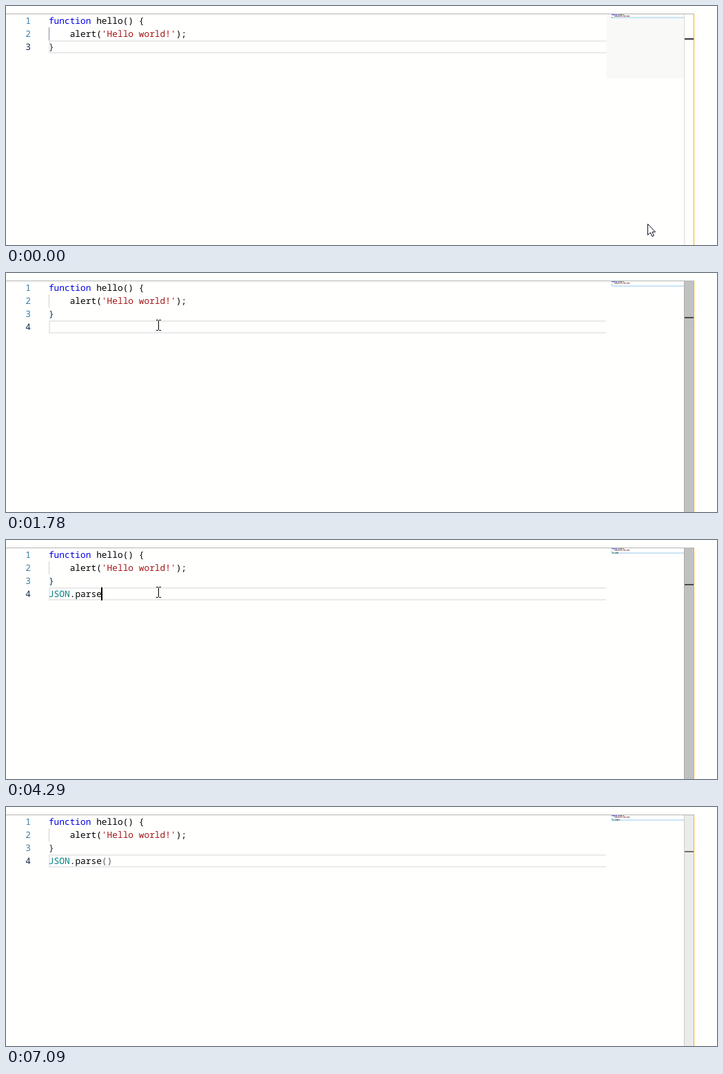
Animation of 1032x348 px, one loop 7.17 s. Source, as an HTML page:

```html
<!DOCTYPE html>
<html lang="en">
<head>
<meta charset="utf-8">
<title>Code editor</title>
<style>
  html, body { margin: 0; width: 100%; height: 100%; overflow: hidden; background: #fffffe; }
  svg { display: block; width: 1032px; height: 348px; }
  text { white-space: pre; text-rendering: geometricPrecision; font: 12.83px "Noto Sans Mono", monospace; }
  .small { font-size: 10.92px; }
  .doc { font: 13.48px "Open Sans", sans-serif; }
</style>
</head>
<body>
<svg id="stage" viewBox="0 0 1032 348"></svg>
<script>
const LOOP = 7170;
const CHAR = 7.697, LEFT = 61.9, LINE = 19, TOP = 12;
const MOVE_IN = [70, 150, 230, 310, 380, 460];
const MOVE_OUT = [6400, 6480, 6550, 6630];
const FADE = [6860, 6940, 7010, 7090];
const MAP_FADE = [.04, .12, .16, .1, .04, 0, 0];
const CARET_ON = [[610, 1090], [1320, 1780], [1950, 2410], [2560, 3100], [3330, 4080],
                  [4290, 4750], [4980, 5450], [5930, 6400]];
const TYPED = [[1320, ''], [1950, 'J'], [2560, 'JSON'], [3330, 'JSON.'],
               [3580, 'JSON.p'], [4290, 'JSON.parse'], [4980, 'JSON.parse()']];

const stage = document.getElementById('stage');

function add(parent, tag, attrs) {
  const el = document.createElementNS('http://www.w3.org/2000/svg', tag);
  for (const key in attrs) el.setAttribute(key, attrs[key]);
  parent.appendChild(el);
  return el;
}
const group = (parent = stage) => add(parent, 'g', {});
const box = (x, y, width, height, fill, parent = stage) =>
  add(parent, 'rect', { x, y, width, height, fill });
const frame = (x, y, w, h, fill, stroke, parent = stage) =>
  add(parent, 'rect', { x: x + .5, y: y + .5, width: w - 1, height: h - 1, fill, stroke });
const path = (d, stroke, parent, fill = 'none') => add(parent, 'path', { d, stroke, fill });

// parts: [text, colour, weight] runs set on one line
function write(x, y, parts, parent = stage, cls = '') {
  const el = add(parent, 'text', { x, y, class: cls });
  return parts.map(([str, fill, weight = 400]) => {
    const run = add(el, 'tspan', { fill, 'font-weight': weight });
    run.textContent = str;
    return run;
  });
}

const set = (el, attrs) => { for (const key in attrs) el.setAttribute(key, attrs[key]); };
const show = (el, on) => el.setAttribute('visibility', on ? 'visible' : 'hidden');
const place = (el, x, y) => el.setAttribute('transform', `translate(${x} ${y})`);
const passed = (times, t) => times.filter(v => v <= t).length;
const within = (t, a, b) => t >= a && t < b;
const ease = u => u * u * (3 - 2 * u);
const baseline = line => TOP + LINE * line + 14;

// Editor frame
box(0, 0, 1032, 348, '#fffffe');
const mapSlider = box(871, 12, 113, 93, '#646464');
const mapLine = box(879, 16, 105, 2, '#c9e4f6');
box(984, 12, 1, 336, '#dadada');
const tick = box(985, 47, 13, 2, '#3c3640');
const track = box(984, 12, 14, 336, '#646464');
box(0, 11, 999, 1, '#b4b4b4');
box(998, 12, 1, 336, '#f2b010');

// Current line outline, indent guide and bracket marks
const current = group();
box(62, 0, 809, 2, '#eaeaea', current);
box(62, 17, 809, 2, '#eaeaea', current);
box(62, 0, 2, 19, '#eaeaea', current);
const guide = box(62, 31, 1, 19, '#8f8a98');

const bracket = (x, y, parent) => frame(x, y, 8, 19, '#e2efe2', '#b9b9b9', parent);
const braces = group();
bracket(193, 12, braces);
bracket(62, 50, braces);
box(985, 12, 6, 18, '#878787', braces);
box(985, 49, 6, 17, '#878787', braces);
const parens = group();
bracket(139, 69, parens);
bracket(146, 69, parens);
box(985, 66, 6, 17, '#878787', parens);

// Code
const numbers = [0, 1, 2, 3].map(i => write(28.3, baseline(i), [[String(i + 1), '#237893']])[0]);
write(LEFT, baseline(0), [['function', '#0000e6'], [' hello() {', '#000']]);
write(LEFT, baseline(1), [['    alert(', '#000'], ["'Hello world!'", '#a31515'], [');', '#000']]);
write(LEFT, baseline(2), [['}', '#10303a']]);
const [object, member, call] = write(LEFT, baseline(3), [['', '#000'], ['', '#000'], ['', '#5a5a5a']]);

// Overview: one small block for each character
function blocks(str, line, colour) {
  return [...str].map((c, i) => {
    const low = '.,_'.includes(c);
    const el = box(879 + i, 12 + line * 2 + (low ? 1 : 0), 1, low ? .6 : 1.4, colour(i));
    el.setAttribute('opacity', c === ' ' ? 0 : .4 + (c.charCodeAt(0) % 4) * .08);
    return el;
  });
}
blocks('function hello() {', 0, i => i < 8 ? '#0000c8' : '#000');
blocks("    alert('Hello world!');", 1, i => i > 9 && i < 24 ? '#701515' : '#000');
blocks('}', 2, () => '#000');
const mapTyped = blocks('JSON.parse()', 3, i => i < 4 ? '#008080' : '#000');

const caret = box(0, 0, 2, 19, '#000');

// Suggestion list
function cube(x, y, stroke, parent) {
  path(`M${x + 6} ${y + .5}l5.5 2.7v6.6l-5.5 3-5.5-3v-6.6zm-5.5 2.9l5.5 2.7 5.5-2.7m-5.5 2.7v6.5`, stroke, parent);
}
function page(x, y, stroke, parent) {
  path(`M${x + 1} ${y + .5}h6.5l3.5 3.5v8.5h-10zm6.5 0v3.5h3.5`, stroke, parent);
}
function list(names, hasDetail) {
  const g = group();
  frame(0, 88, 432, names.length * LINE + 4, '#f3f3f3', '#c8c8c8', g);
  box(1, 89, 430, LINE, '#0060c0', g);
  names.forEach((name, i) => {
    const y = 89 + i * LINE;
    const isMethod = name === 'parse' || name === 'stringify';
    const ink = i ? (isMethod ? '#6a5a90' : '#555') : '#fff';
    (isMethod ? cube : page)(5, y + 3, ink, g);
    write(23, y + 14, [[name, i ? '#111' : '#fff']], g);
  });
  if (hasDetail) {
    write(142, 102, [['(method) JSON.parse(text: string, reviver…', '#d6e6f6']], g, 'small');
  }
  return g;
}
const lists = [
  { el: list(['JSON'], false), col: 1, from: 1950, to: 2560 },
  { el: list(['parse', 'stringify', 'JSON', 'alert', 'hello'], true), col: 5, from: 3330, to: 3580 },
  { el: list(['parse'], true), col: 6, from: 3580, to: 4290 }
];
lists.forEach(l => place(l.el, Math.round(LEFT + l.col * CHAR), 0));

// Parameter hint
const hint = group();
const GREY = '#616161';
frame(147, 88, 442, 111, '#f3f3f3', '#c8c8c8', hint);
box(148, 135, 440, 1, '#dcdcdc', hint);
write(152.7, 106, [['parse(', GREY], ['text: string', '#0066bf', 700],
  [', reviver?: (this: any, key: string,', GREY]], hint);
write(152.7, 125, [['value: any) => any): any', GREY]], hint);
write(152.7, 159, [['A valid JSON string.', GREY]], hint, 'doc');
write(152.7, 186, [['Converts a JavaScript Object Notation (JSON) string into an object.', GREY]], hint, 'doc');

// Mouse pointers
const arrow = group();
path('M.5 .5V16.5L4.3 12.9 6.8 18.5 9.3 17.4 6.9 12H11.6Z', '#151020', arrow, '#fff');
const beam = group();
path('M-3 -7.5h2.5l1 1 1-1h2.5M.5 -6.5v13M-3 7.5h2.5l1-1 1 1h2.5', '#000', beam);

function pointer(t) {
  let x, y;
  const out = passed(MOVE_OUT, t);
  if (out) {
    const e = ease(out / 4);
    x = 221 + 765 * e;
    y = 76 + 236 * e;
  } else {
    const e = ease(passed(MOVE_IN, t) / 6);
    x = 931 - 710 * e;
    y = 317 - 241 * e;
  }
  x = Math.round(x);
  y = Math.round(y);
  const on = t < FADE[0], isArrow = x > 871;
  place(arrow, x, y);
  place(beam, x, y);
  show(arrow, on && isArrow);
  show(beam, on && !isArrow);
}

function draw(t) {
  const step = passed(MOVE_IN, t);
  const left = passed(FADE, t);
  const shown = left ? 1 - .17 * left : Math.min(1, step * .4);
  track.setAttribute('opacity', .4 * shown);
  mapSlider.setAttribute('opacity', MAP_FADE[step]);

  const entered = t >= 1320;
  const row = entered ? 3 : 2;
  const count = passed(TYPED.map(v => v[0]), t);
  const str = count ? TYPED[count - 1][1] : '';
  place(current, 0, TOP + row * LINE);
  mapLine.setAttribute('y', 12 + row * 2);
  set(tick, { y: entered ? 64 : 47, fill: left ? '#77705f' : '#3c3640' });
  guide.setAttribute('fill', entered ? '#dccfc2' : '#8f8a98');
  numbers.forEach((n, i) => n.setAttribute('fill', i === row ? '#102c4c' : '#3a7ea8'));
  show(numbers[3], entered);

  object.textContent = str.slice(0, 4);
  object.setAttribute('fill', t >= 2640 ? '#008080' : '#101018');
  member.textContent = str.slice(4, 10);
  call.textContent = str.slice(10);
  mapTyped.forEach((el, i) => show(el, i < str.length));

  const col = entered ? Math.min(str.length, 11) : 1;
  set(caret, { x: Math.max(62, Math.floor(61.5 + col * CHAR)), y: TOP + row * LINE });
  show(caret, CARET_ON.some(([a, b]) => within(t, a, b)));

  show(braces, within(t, 700, 1320));
  show(parens, within(t, 4980, FADE[0]));
  lists.forEach(l => show(l.el, within(t, l.from, l.to)));
  show(hint, within(t, 5130, FADE[0]));
  pointer(t);
}

const start = performance.now();
function tickFrame(now) {
  draw(Math.max(0, now - start) % LOOP);
  requestAnimationFrame(tickFrame);
}
draw(0);
requestAnimationFrame(tickFrame);
</script>
</body>
</html>
```
